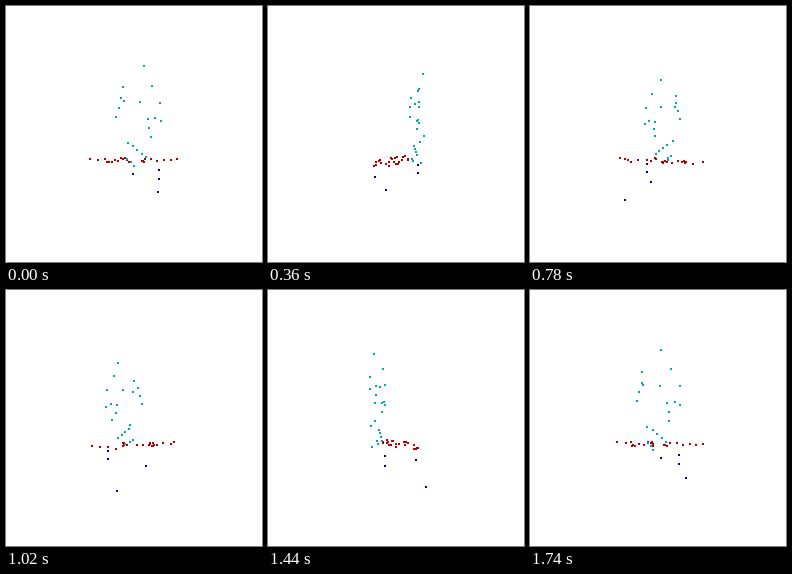
A matplotlib script for the animation above (1.8 s loop, 256 by 256 pixels).

```python
import numpy as np
import matplotlib.pyplot as plt
from matplotlib.animation import FuncAnimation

SIZE = 256
FRAMES = 30
STEP_MS = 60
CENTER_X, HORIZON = 128.5, 153.5
CAMERA = 225   # camera distance
TILT = 0.11    # slight view from above
DOT = 2 * 72 / 100   # two pixels, in points


def stroke(count, *corners):
    """Evenly spaced dots along a polyline; the first one stands nearer."""
    x, y = np.array(corners, float).T
    length = np.append(0, np.cumsum(np.hypot(np.diff(x), np.diff(y))))
    at = np.linspace(0, length[-1], count)
    z = np.where(at == 0, 25, 18)
    return np.column_stack((np.interp(at, length, x), np.interp(at, length, y), z))


def upright():
    """Tall shape standing in one plane in front of the axis."""
    return np.vstack((
        stroke(4, (8, 85.5), (23.5, 54), (24, 37)),
        stroke(4, (-10, 67), (-17, 41)),
        stroke(2, (-9, 55), (5.5, 55)),
        stroke(4, (15, 23), (12, 40), (19, 40)),
        stroke(5, (-5.6, 17.5), (11, 4)),
        stroke(3, (0, -3), (-6.5, 2)),
    ))


def ground(count=22):
    """Wavy band of dots, dense left of the axis and sparse at both ends."""
    k = np.arange(count)
    u = np.linspace(-1, 1, count)
    x = np.interp(k, [0, 2, 6, 12, 13, 16, 21], [-45, -30, -19, -5, 7.5, 10.5, 43.5])
    z = -3 - 14 * np.sqrt(1 - u ** 2) * np.cos(2 * np.pi * k / 9)
    y = np.random.default_rng(4).uniform(-3, 0, count)
    return np.column_stack((x, y, z))


def project(points, angle):
    x, y, z = points.T
    c, s = np.cos(angle), np.sin(angle)
    side, depth = x * c + z * s, z * c - x * s
    scale = CAMERA / (CAMERA - depth)
    spots = np.column_stack((CENTER_X + side * scale,
                             HORIZON - (y - TILT * depth) * scale))
    return np.round(spots)   # keep the dots crisp


fig = plt.figure(figsize=(SIZE / 100, SIZE / 100), dpi=100, facecolor="white")
ax = fig.add_axes([0, 0, 1, 1])
ax.set(xlim=(0, SIZE), ylim=(SIZE, 0))
ax.axis("off")

below = np.array([(22.3, -8, 17.5), (22.3, -16.5, 17.5), (-2, -18.2, -22), (26, -38.2, -20.5)])
clouds = []
for points, color in ((ground(), "#b00000"), (upright(), "#00a8b0"), (below, "#0000a0")):
    dots = ax.scatter([], [], s=DOT ** 2, marker="s", c=color,
                      linewidths=0, antialiased=False)
    clouds.append((dots, points))


def update(frame):
    angle = 2 * np.pi * frame / FRAMES
    for dots, points in clouds:
        dots.set_offsets(project(points, angle))
    return [dots for dots, _ in clouds]


anim = FuncAnimation(fig, update, frames=FRAMES, interval=STEP_MS,
                     repeat=True, repeat_delay=0, blit=False)
plt.show()
```
